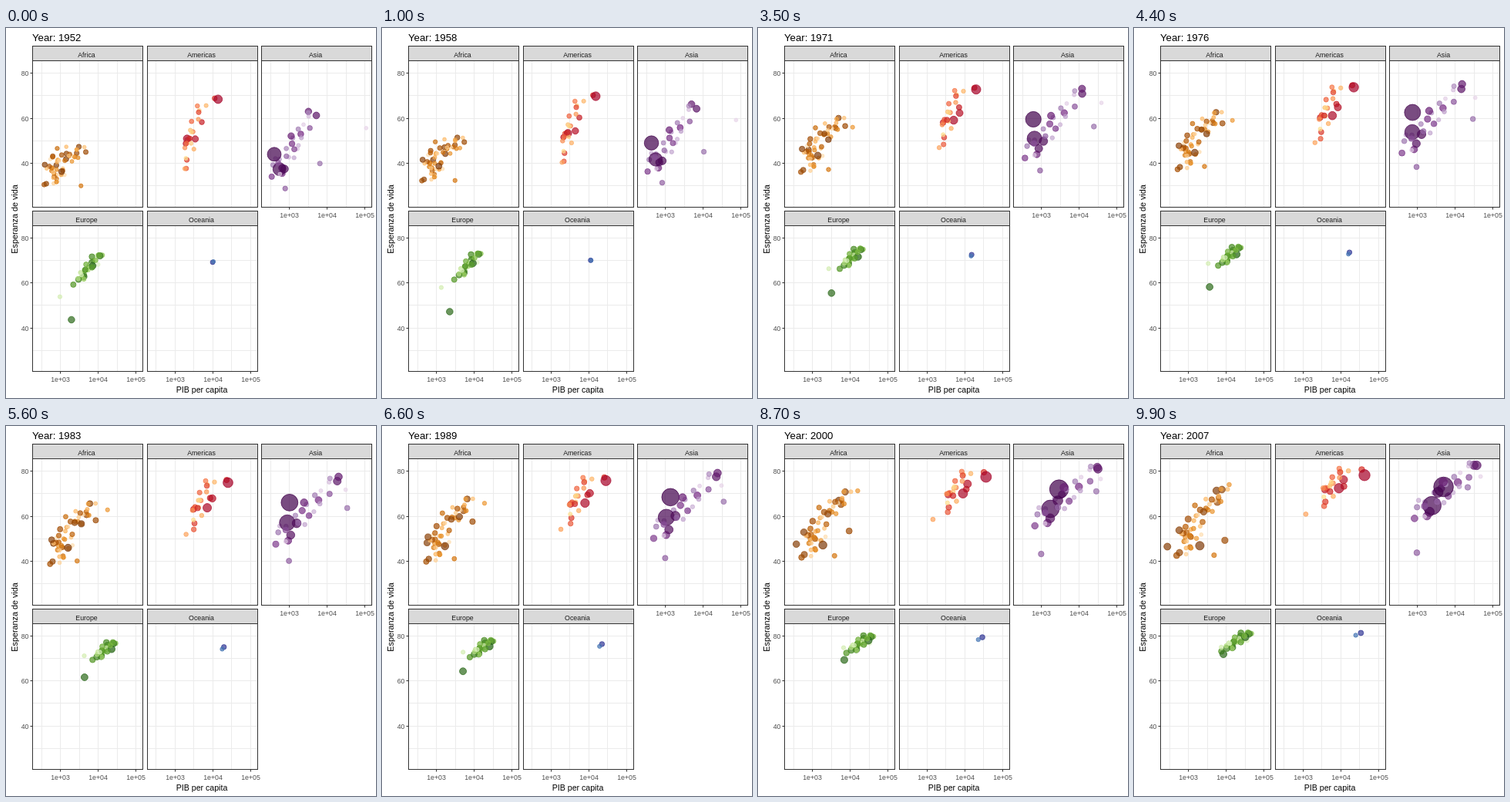
These frames come from a looping animation (480x480 px, 10000 ms). An HTML page with a canvas:

```html
<!DOCTYPE html>
<html lang="es">
<head>
<meta charset="utf-8">
<title>Esperanza de vida</title>
<style>
html, body { margin: 0; width: 100%; height: 100%; overflow: hidden; background: #fff }
canvas { display: block; width: 480px; height: 480px }
</style>
</head>
<body>
<canvas id="stage" width="480" height="480"></canvas>
<script>
const ctx = document.getElementById('stage').getContext('2d');
const FRAMES = 100, STEP = 100, MID = 30 / 55;
const INK = '#333', GRID = '#ebebeb';

// cloud: poorest and richest end (income, life) in 1952, 1982 and 2007; dots scatter around that line
// tracks: population, then income and life in the same three years, for dots that stand apart
const panels = [
  {
    name: 'Africa', col: 0, row: 0, growth: .26,
    ramp: ['7F3B08', 'B35806', 'E08214', 'FDB863', 'FEE0B6'],
    n: 46, pops: [65, .095], skew: 1.5, spread: [.2, 6.5],
    cloud: [[420, 36, 3500, 46], [600, 44, 7000, 65], [550, 48, 9500, 72]],
    tracks: [
      [135, 1077, 36.3, 1577, 45.8, 2014, 46.9],
      [80, 1419, 41.9, 3503, 56, 5581, 71.3],
      [65, 781, 39.1, 674, 47.8, 278, 46.5],
      [44, 4725, 45, 8568, 58.2, 9270, 49.3],
      [12, 3521, 30, 2757, 39.9, 4797, 42.7],
      [6, 2388, 42.7, 17364, 62.2, 12057, 74]
    ]
  },
  {
    name: 'Americas', col: 1, row: 0, growth: .44,
    ramp: ['A50026', 'D73027', 'F46D43', 'FDAE61', 'FEE090'],
    n: 20, pops: [45, .14], skew: 1, spread: [.13, 4.5],
    cloud: [[1600, 41, 5800, 64], [2500, 57, 9500, 73], [2900, 68, 14000, 78]],
    tracks: [
      [301, 13990, 68.4, 25010, 74.7, 42952, 78.2],
      [190, 2109, 50.9, 7031, 63.3, 9066, 72.4],
      [109, 3478, 50.8, 9611, 67.4, 11978, 76.2],
      [33, 11367, 68.8, 22899, 75.8, 36319, 80.7],
      [8, 1840, 37.6, 2011, 51.5, 1202, 60.9]
    ]
  },
  {
    name: 'Asia', col: 2, row: 0, axis: true, growth: .41,
    ramp: ['40004B', '762A83', '9970AB', 'C2A5CF', 'E7D4E8'],
    n: 26, pops: [170, .17], skew: 1.2, spread: [.18, 4.5],
    cloud: [[450, 37, 5000, 59], [560, 50, 19000, 73], [1100, 62, 40000, 80]],
    tracks: [
      [1319, 400, 44, 962, 65.5, 4959, 73],
      [1110, 547, 37.4, 856, 56.6, 2452, 64.7],
      [223, 750, 37.5, 1517, 56.2, 3541, 70.6],
      [127, 3217, 63, 19384, 77.1, 31656, 82.6],
      [32, 779, 28.8, 978, 39.9, 975, 43.8],
      [28, 6460, 39.9, 33693, 63, 21655, 72.8],
      [2, 108382, 55.6, 31354, 71.3, 47307, 77.6]
    ]
  },
  {
    name: 'Europe', col: 0, row: 1, axis: true, growth: .75,
    ramp: ['276419', '4D9221', '7FBC41', 'B8E186', 'E6F5D0'],
    n: 27, pops: [62, .115], skew: .9, spread: [.1, 1.7],
    cloud: [[2500, 60, 11000, 72.5], [8000, 70, 24000, 76.5], [8500, 74, 40000, 81]],
    tracks: [
      [82, 7144, 67.5, 22032, 73.8, 32170, 79.4],
      [71, 1969, 43.6, 4241, 61, 8458, 71.8],
      [4, 974, 53.8, 4127, 70.7, 7446, 74.9]
    ]
  },
  {
    name: 'Oceania', col: 1, row: 1, axis: true, growth: .43,
    ramp: ['313695', '4575B4'], n: 0,
    tracks: [
      [20, 10040, 69.1, 19477, 74.7, 34435, 81.2],
      [4, 10557, 69.4, 17632, 73.8, 25185, 80.2]
    ]
  }
];

let seed = 2027;
function rnd(lo, hi) {
  seed = seed * 16807 % 2147483647;
  return lo + (hi - lo) * seed / 2147483647;
}
const lerp = (a, b, f) => a + (b - a) * f;
const snap = v => Math.floor(v) + .5;

function trackDot([pop, ...pose]) {
  return {
    pop,
    x: pose.filter((_, i) => i % 2 === 0).map(Math.log10),
    y: pose.filter((_, i) => i % 2)
  };
}

function cloudDot({ cloud, pops, skew, spread }, i) {
  const s = ((i + .5) * .618034 % 1) ** skew;
  const dx = rnd(-spread[0], spread[0]), dy = rnd(-spread[1], spread[1]);
  return {
    pop: pops[0] * Math.exp(-pops[1] * i),
    x: cloud.map(([g0, , g1]) => lerp(Math.log10(g0), Math.log10(g1), s) + dx),
    y: cloud.map(([, l0, , l1]) => lerp(l0, l1, s) + dy)
  };
}

function rampColor(ramp, f) {
  const p = f * (ramp.length - 1), i = Math.min(Math.floor(p), ramp.length - 2);
  const part = (hex, k) => parseInt(hex.slice(k, k + 2), 16);
  const mix = k => Math.round(lerp(part(ramp[i], k), part(ramp[i + 1], k), p - i));
  return `rgb(${mix(0)},${mix(2)},${mix(4)})`;
}

// Larger populations get darker colours; the stacking order is random
for (const p of panels) {
  const crowd = Array.from({ length: p.n }, (_, i) => cloudDot(p, i));
  p.dots = [...p.tracks.map(trackDot), ...crowd].sort((a, b) => b.pop - a.pop);
  p.dots.forEach((d, i) => {
    d.color = rampColor(p.ramp, i / (p.dots.length - 1));
    d.z = rnd(0, 1);
  });
  p.dots.sort((a, b) => a.z - b.z);
}

// Parabola through a at 0, b at MID and c at 1
function curve([a, b, c], u) {
  const k = (b - lerp(a, c, MID)) / (MID * (1 - MID));
  return lerp(a, c, u) + k * u * (1 - u);
}

const px = (p, logIncome) => 70.5 + 148.5 * p.col + 49 * (logIncome - 3);
const py = (p, life) => 58.5 + 213.5 * p.row + 2.925 * (80 - life);

function line(x1, y1, x2, y2, color) {
  ctx.strokeStyle = color;
  ctx.lineWidth = 1;
  ctx.beginPath();
  ctx.moveTo(x1, y1);
  ctx.lineTo(x2, y2);
  ctx.stroke();
}

function text(s, x, y, size, color, align = 'center') {
  ctx.font = `${size}px "Liberation Sans", Arial, sans-serif`;
  ctx.textAlign = align;
  ctx.fillStyle = color;
  ctx.fillText(s, x, y);
}

function drawDot(p, d, u) {
  const pop = d.pop * p.growth ** (1 - u);
  const size = 2 + 10 * Math.sqrt(pop / 1319);
  ctx.beginPath();
  ctx.arc(px(p, curve(d.x, u)), py(p, curve(d.y, u)), 1.067 * size, 0, 7);
  ctx.fillStyle = ctx.strokeStyle = d.color;
  ctx.lineWidth = 1;
  ctx.fill();
  ctx.stroke();
}

function drawPanel(p, u) {
  const x = snap(34.5 + 148.5 * p.col), y = 23.5 + 214 * p.row;
  const top = y + 19, height = 190 - p.row, bottom = top + height;
  for (let g = 2.5; g <= 5; g += .5) line(snap(px(p, g)), top, snap(px(p, g)), bottom, GRID);
  for (let l = 30; l <= 80; l += 10) line(x, snap(py(p, l)), x + 143, snap(py(p, l)), GRID);

  ctx.globalAlpha = .7;
  p.dots.forEach(d => drawDot(p, d, u));
  ctx.globalAlpha = 1;

  ctx.fillStyle = '#d9d9d9';
  ctx.fillRect(x, y, 143, 19);
  ctx.strokeStyle = INK;
  ctx.lineWidth = 1;
  ctx.strokeRect(x, y, 143, 19);
  ctx.strokeRect(x, top, 143, height);
  text(p.name, x + 70, y + 14.5, 8.8, '#1a1a1a');

  if (p.axis) for (const g of [3, 4, 5]) {
    const tx = snap(px(p, g));
    line(tx, bottom, tx, bottom + 3, INK);
    text('1e+0' + g, tx, bottom + 13, 8.8, '#4d4d4d');
  }
  if (p.col === 0) for (const l of [40, 60, 80]) {
    const ty = snap(py(p, l));
    line(x - 3, ty, x, ty, INK);
    text(l, x - 5, ty + 3.5, 8.8, '#4d4d4d', 'right');
  }
}

function draw(now) {
  const u = Math.floor(now / STEP) % FRAMES / (FRAMES - 1);
  ctx.fillStyle = '#fff';
  ctx.fillRect(0, 0, 480, 480);
  panels.forEach(p => drawPanel(p, u));
  text('Year: ' + Math.round(1952 + 55 * u), 34, 17, 13.2, '#000', 'left');
  text('PIB per capita', 254, 472.5, 10.6, '#000');
  ctx.save();
  ctx.translate(15, 248);
  ctx.rotate(-Math.PI / 2);
  text('Esperanza de vida', 0, 0, 10.8, '#000');
  ctx.restore();
}

const start = performance.now();
function tick() {
  draw(performance.now() - start);
  requestAnimationFrame(tick);
}
tick();
</script>
</body>
</html>
```
